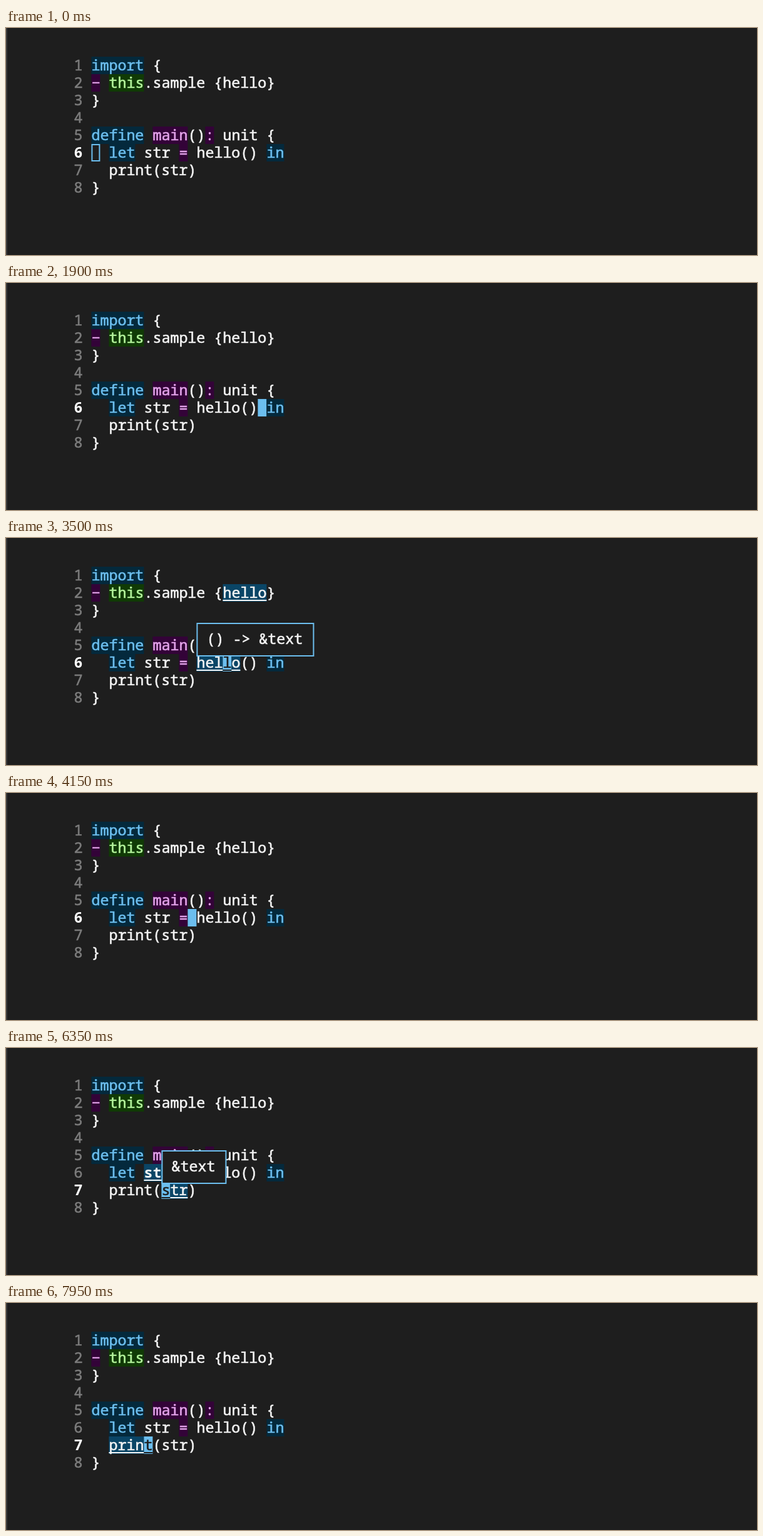
Animation, 1200 px wide and 364 px high, one loop 8 s. Source, as an HTML page:

```html
<!DOCTYPE html>
<html lang="en">
<head>
<meta charset="utf-8">
<title>Code editor</title>
<style>
  html, body { margin: 0; width: 100%; height: 100%; overflow: hidden; background: #1e1e1e; }
  svg { display: block; width: 1200px; height: 364px; }
  text { font: 23.333px "Noto Sans Mono", "DejaVu Sans Mono", monospace; white-space: pre; font-variant-ligatures: none; stroke-width: .6px; }
  text.bold { font-weight: 700; stroke-width: 0; }
</style>
</head>
<body>
<svg id="stage" viewBox="0 0 1200 364"></svg>
<script>
const LOOP = 8000, LEFT = 136.4, TOP = 46, CELL = 14, ROW = 28, BASE = 22;
const BG = '#1e1e1e', FG = '#f4f4f4', BLUE = '#6cbeee';

const lines = [
  'import {',
  '− this.sample {hello}',
  '}',
  '',
  'define main(): unit {',
  '  let str = hello() in',
  '  print(str)',
  '}'
];

const styles = {
  key: { fg: BLUE, bg: '#04293c' },
  def: { fg: '#e3a3ea', bg: '#330338' },
  self: { fg: '#b4f59c', bg: '#103a05' }
};

// row, first column, length, style
const tokens = [
  [0, 0, 6, 'key'], [1, 0, 1, 'def'], [1, 2, 4, 'self'],
  [4, 0, 6, 'key'], [4, 7, 4, 'def'], [4, 13, 1, 'def'],
  [5, 2, 3, 'key'], [5, 10, 1, 'def'], [5, 20, 2, 'key']
];

// time, row, column
const moves = [
  [0, 5, 0], [1400, 5, 22],
  [1700, 5, 21], [1800, 5, 20], [1900, 5, 19], [2000, 5, 18],
  [2100, 5, 17], [2200, 5, 16], [2300, 5, 15],
  [3650, 5, 14], [3750, 5, 13], [3850, 5, 12], [3950, 5, 11],
  [4300, 5, 10], [4400, 5, 9], [4500, 5, 8],
  [5500, 6, 8], [7050, 6, 7], [7200, 6, 6]
];
const FOCUS = 1000;

// start, end, marked ranges: row, column, length, bold
const marks = [
  [2550, 3950, [[1, 15, 5], [5, 12, 5]]],
  [4700, 7050, [[5, 6, 3, true], [6, 8, 3]]],
  [7400, LOOP, [[6, 2, 5]]]
];

// start, end, row, column, label
const hints = [
  [2850, 3650, 5, 12, '() -> &text'],
  [4900, 5500, 5, 6, '&text'],
  [5850, 7050, 6, 8, '&text']
];

const stage = document.getElementById('stage');
const px = col => LEFT + col * CELL;
const py = row => TOP + row * ROW;
const active = (list, t) => list.find(e => t >= e[0] && t < e[1]);
const escapeText = s => s.replace(/&/g, '&amp;').replace(/</g, '&lt;').replace(/>/g, '&gt;');
const rect = (x, y, w, h, fill, extra = '') =>
  `<rect x="${x}" y="${y}" width="${w}" height="${h}" fill="${fill}" ${extra}/>`;
const label = (x, y, s, color, bold) =>
  `<text x="${x}" y="${y}" fill="${color}" stroke="${color}"${bold ? ' class="bold"' : ''}>${escapeText(s)}</text>`;

function cellStyle(row, col, cursor, mark) {
  const token = tokens.find(k => k[0] === row && col >= k[1] && col < k[1] + k[2]);
  const style = { fg: FG, bg: '', line: false, bold: false, ...(token && styles[token[3]]) };
  const range = mark && mark[2].find(r => r[0] === row && col >= r[1] && col < r[1] + r[2]);
  if (range) Object.assign(style, { bg: '#0a4566', line: true, bold: !!range[3] });
  if (cursor.on && cursor.row === row && cursor.col === col) {
    style.bg = BLUE;
    style.fg = BG;
  }
  return style;
}

function drawRow(row, cursor, mark) {
  const y = py(row), s = lines[row];
  const here = row === cursor.row;
  const count = Math.max(s.length, here ? cursor.col + 1 : 0);
  let back = '', front = label(px(-2), y + BASE, String(row + 1), here ? '#ffffff' : '#7c7c7c', here);
  for (let col = 0; col < count;) {
    const style = cellStyle(row, col, cursor, mark), id = JSON.stringify(style);
    let end = col + 1;
    while (end < count && JSON.stringify(cellStyle(row, end, cursor, mark)) === id) end++;
    const width = (end - col) * CELL;
    if (style.bg) back += rect(px(col), y, width, ROW, style.bg);
    front += label(px(col), y + BASE, s.slice(col, end), style.fg, style.bold);
    if (style.line) front += rect(px(col), y + 25, width, 2, style.fg);
    col = end;
  }
  return back + front;
}

function drawHint([, , row, col, s]) {
  const x = px(col), y = py(row) - 50;
  return rect(x + 1, y + 1, s.length * CELL + 32, 52, BG, `stroke="${BLUE}" stroke-width="2"`) +
    label(x + 16, y + 34, s, FG);
}

let shown = '';
function render(t) {
  const [, row, col] = moves.filter(m => m[0] <= t).pop();
  const cursor = { row, col, on: t >= FOCUS };
  const mark = active(marks, t), hint = active(hints, t);
  let out = rect(0, 0, 1200, 364, BG) + rect(0, 0, 1200, 1, '#18191b') + rect(0, 0, 2, 364, '#3b3b3b');
  lines.forEach((_, i) => { out += drawRow(i, cursor, mark); });
  if (!cursor.on) {
    out += rect(px(col) + 1, py(row) + 1, CELL - 2, ROW - 2, 'none', `stroke="${BLUE}" stroke-width="2"`);
  }
  if (hint) out += drawHint(hint);
  if (out !== shown) stage.innerHTML = shown = out;
}

const start = performance.now();
function tick() {
  render((performance.now() - start) % LOOP);
  requestAnimationFrame(tick);
}
render(0);
requestAnimationFrame(tick);
</script>
</body>
</html>
```
